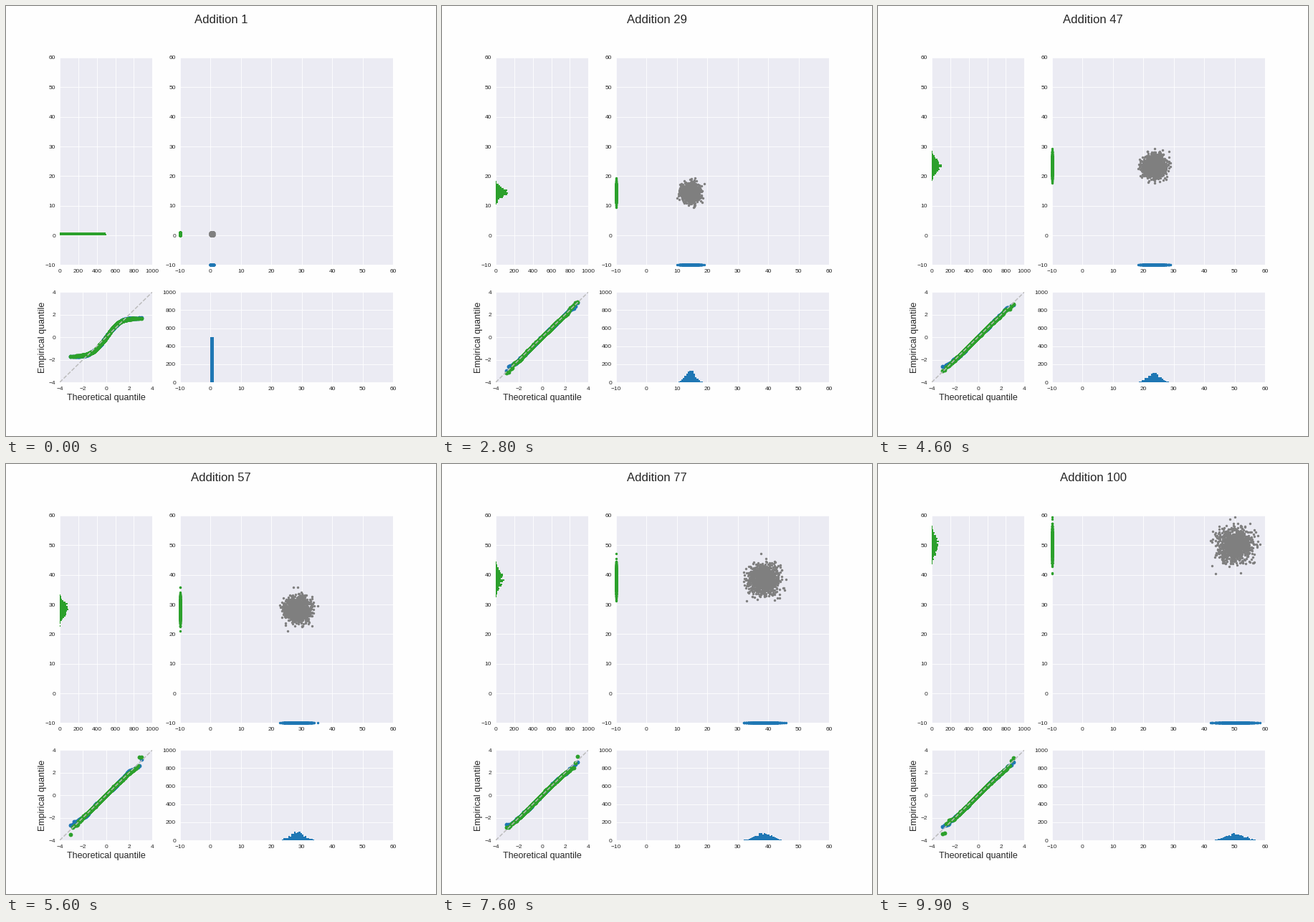
These frames come from a looping animation (600x600 px, 10 s). A matplotlib script:

```python
import math

import matplotlib.pyplot as plt
import numpy as np
from matplotlib.animation import FuncAnimation
from matplotlib.gridspec import GridSpec

STEPS, COUNT = 100, 1000
BLUE, GREEN, GREY = "#1f77b4", "#2ca02c", "#7f7f7f"
INK = "0.15"

plt.rcParams.update({
    "font.family": "Liberation Sans",
    "font.size": 10,
    "text.color": INK,
    "axes.facecolor": "#ebebf3",
    "axes.labelcolor": INK,
    "axes.labelsize": 15,
    "axes.linewidth": 0,
    "axes.grid": True,
    "axes.axisbelow": True,
    "grid.color": "white",
    "grid.linewidth": 1,
    "grid.linestyle": "-",
    "xtick.color": INK,
    "ytick.color": INK,
    "xtick.major.size": 0,
    "ytick.major.size": 0,
    "xtick.major.pad": 7,
    "ytick.major.pad": 7,
})


def walk(spare=8):
    """Running sums of uniform draws, shape (step, walker, axis).

    A few spare walkers are drawn so that the wildest can be dropped.
    """
    rng = np.random.RandomState(0)
    sums = rng.rand(STEPS, COUNT + spare, 2).cumsum(axis=0)
    n = np.arange(1, STEPS + 1)[:, None, None]
    stray = np.abs(sums - n / 2) / np.sqrt(n / 12)
    calm = np.argsort(stray.max(axis=(0, 2)))[:COUNT]
    return sums[:, calm]


def normal_quantiles(n):
    grid = np.linspace(-5, 5, 4001)
    cdf = [0.5 * (1 + math.erf(v / math.sqrt(2))) for v in grid]
    return np.interp(np.arange(1, n + 1) / (n + 1), cdf, grid)


def setup(ax, xlim, xstep, ylim, ystep):
    ax.set(xlim=xlim, ylim=ylim,
           xticks=np.arange(xlim[0], xlim[1] + 1, xstep),
           yticks=np.arange(ylim[0], ylim[1] + 1, ystep))


def dots(ax, color, size, **kw):
    return ax.plot([], [], "o", color=color, ms=size, mew=0, **kw)[0]


sums = walk()
theory = normal_quantiles(COUNT)
bins = np.arange(-10, 60.5, 0.5)
empty = np.zeros(len(bins) - 1)

fig = plt.figure(figsize=(10, 10), dpi=60, facecolor="#fefefe")
grid = GridSpec(3, 3, figure=fig, left=0.125, right=0.9, bottom=0.125,
                top=0.88, wspace=0.3, hspace=0.3)
ax_cloud = fig.add_subplot(grid[:2, 1:])
ax_left = fig.add_subplot(grid[:2, 0])
ax_low = fig.add_subplot(grid[2, 1:])
ax_qq = fig.add_subplot(grid[2, 0])

span, counts, quant = (-10, 60), (0, 1000), (-4, 4)
title = fig.suptitle("", fontsize=20)

cloud = dots(ax_cloud, GREY, 4.1)
rugs = [dots(ax_cloud, c, 4.1, clip_on=False, zorder=3) for c in (BLUE, GREEN)]
hists = [
    ax_low.stairs(empty, bins, fill=True, color=BLUE, lw=0),
    ax_left.stairs(empty, bins, fill=True, color=GREEN, lw=0,
                   orientation="horizontal"),
]
qqs = [dots(ax_qq, c, 7) for c in (BLUE, GREEN)]
ax_qq.plot(quant, quant, "--", color="#bbbbbb", lw=1.75)
ax_qq.set_xlabel("Theoretical quantile")
ax_qq.set_ylabel("Empirical quantile", labelpad=3)

setup(ax_cloud, span, 10, span, 10)
setup(ax_left, counts, 200, span, 10)
setup(ax_low, span, 10, counts, 200)
setup(ax_qq, quant, 2, quant, 2)


def update(i):
    title.set_text(f"Addition {i + 1}")
    x, y = sums[i].T
    cloud.set_data(x, y)
    edge = np.full(COUNT, span[0])
    rugs[0].set_data(x, edge)
    rugs[1].set_data(edge, y)
    for data, hist, qq in zip((x, y), hists, qqs):
        hist.set_data(np.histogram(data, bins)[0])
        qq.set_data(theory, np.sort((data - data.mean()) / data.std()))
    return [title, cloud, *rugs, *hists, *qqs]


anim = FuncAnimation(fig, update, frames=STEPS, init_func=lambda: update(0),
                     interval=100, repeat=True, repeat_delay=0)
plt.show()
```
